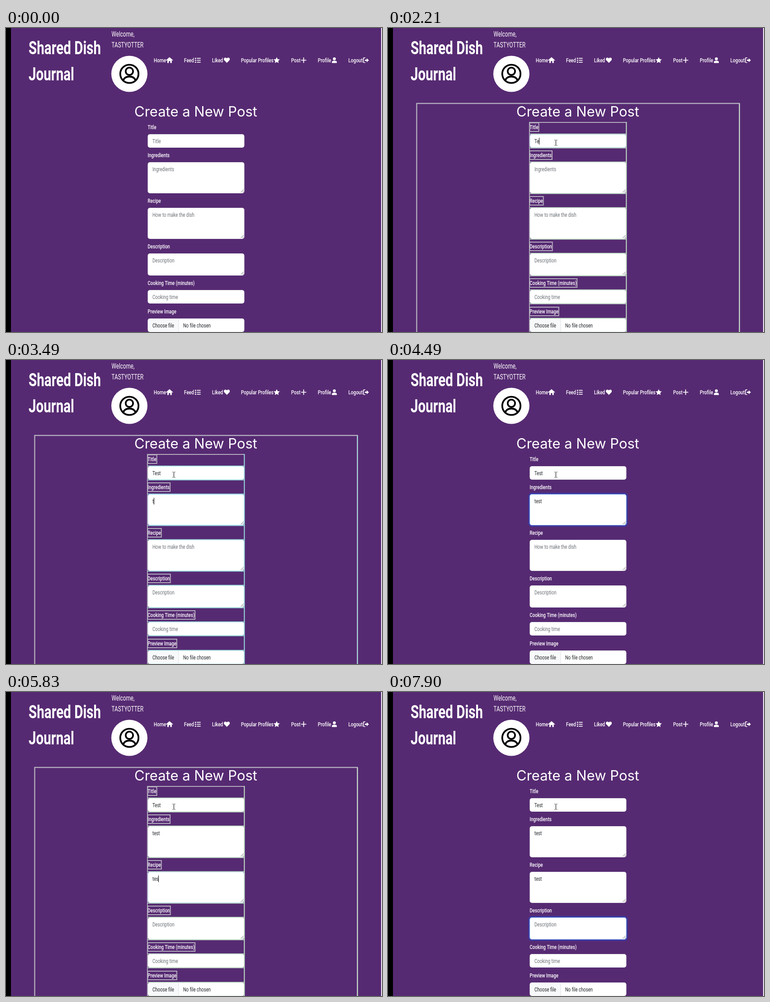
Recreate the animation shown at these times as an HTML page with a canvas. Size 832x673 px, loop 8000 ms.

```html
<!DOCTYPE html>
<html lang="en">
<head>
<meta charset="utf-8">
<title>Create a New Post</title>
<style>
html, body { margin: 0; width: 100%; height: 100%; overflow: hidden; background: #562a72; }
canvas { display: block; }
</style>
</head>
<body>
<canvas id="stage" width="832" height="673"></canvas>
<script>
const ctx = document.getElementById('stage').getContext('2d');
const LOOP = 8000, BLINK = 530;
const PURPLE = '#562a72', WHITE = '#fff', INK = '#212529', MUTED = '#6b7076';
const CONDENSE = 0.74; // one narrow face for the whole page
const LEFT = 313.5, WIDTH = 214;

// label, placeholder, top, height
const fields = [
  ['Title', 'Title', 235, 30],
  ['Ingredients', 'Ingredients', 297, 69],
  ['Recipe', 'How to make the dish', 398, 69],
  ['Description', 'Description', 499, 49],
  ['Cooking Time (minutes)', 'Cooking time', 580, 30],
  ['Preview Image', '', 643, 30]
].map(([label, hint, y, h]) => ({ label, hint, y, h }));

// time, field, value; an empty value means the field gains focus
const events = [
  [1090, 0, ''], [1950, 0, 'T'], [2210, 0, 'Te'], [2410, 0, 'Tes'], [2610, 0, 'Test'],
  [2810, 1, ''], [3490, 1, 't'], [3560, 1, 'te'], [3690, 1, 'tes'], [3760, 1, 'test'],
  [5020, 2, ''], [5360, 2, 't'], [5630, 2, 'te'], [5830, 2, 'tes'], [5900, 2, 'test'],
  [6310, 3, '']
];
const focusTimes = events.filter(e => !e[2]).map(e => e[0]);
const boxedSpans = [[1950, 2940], [3490, 4490], [5360, 6640]];
const mousePath = [
  [777, 664], [690, 625], [553, 548], [420, 440], [330, 350],
  [288, 305], [312, 282], [352, 260], [371, 254]
];

function setFont(size, weight) {
  ctx.font = `${weight} ${size}px Roboto, sans-serif`;
}
function text(str, x, y, size = 13, weight = 400, color = WHITE) {
  ctx.save();
  ctx.translate(x, y);
  ctx.scale(CONDENSE, 1);
  setFont(size, weight);
  ctx.fillStyle = color;
  ctx.fillText(str, 0, 0);
  ctx.restore();
}
function textWidth(str, weight = 400) {
  setFont(13, weight);
  return ctx.measureText(str).width * CONDENSE;
}
function rect(x, y, w, h, color) {
  ctx.fillStyle = color;
  ctx.fillRect(x, y, w, h);
}
function round(x, y, w, h, r, color) {
  ctx.beginPath();
  ctx.roundRect(x, y, w, h, r);
  ctx.fillStyle = color;
  ctx.fill();
}
function disc(x, y, r, color) {
  ctx.beginPath();
  ctx.arc(x, y, r, 0, 7);
  ctx.fillStyle = color;
  ctx.fill();
}
function shape(d, fill) {
  ctx.fillStyle = fill;
  ctx.fill(new Path2D(d));
}
function line(d, color, width, cap = 'butt') {
  ctx.strokeStyle = color;
  ctx.lineWidth = width;
  ctx.lineCap = cap;
  ctx.stroke(new Path2D(d));
}

const icons = {
  Home() {
    line('M355.2 71.4L361.8 65.6L368.4 71.4', WHITE, 1.8, 'round');
    shape('M357 71L361.8 66.5L366.8 71V77.5H363.5V73.3H360.2V77.5H357Z', WHITE);
  },
  Feed() {
    for (const y of [66, 70.3, 74.6]) {
      rect(418, y, 2.6, 2.4, WHITE);
      rect(422.3, y + 0.3, 8.4, 1.7, WHITE);
    }
  },
  Liked() {
    shape('M488.7 77.3L483 71.4C481.3 69.5 482.3 65.7 485.3 65.6' +
      'C487 65.5 488.2 66.6 488.7 67.5C489.2 66.6 490.4 65.5 492.1 65.6' +
      'C495.1 65.7 496.1 69.5 494.4 71.4Z', WHITE);
  },
  'Popular Profiles'() {
    ctx.beginPath();
    for (let i = 0; i < 10; i++) {
      const a = i * Math.PI / 5 - Math.PI / 2, r = i % 2 ? 3.5 : 7.2;
      ctx.lineTo(599 + r * Math.cos(a), 71.8 + r * Math.sin(a));
    }
    ctx.closePath();
    ctx.fillStyle = WHITE;
    ctx.fill();
  },
  Post() {
    line('M653.5 71.3H663.8M658.6 66V76.6', WHITE, 1.8, 'round');
  },
  Profile() {
    disc(726.6, 68.2, 3.2, WHITE);
    round(721, 72.6, 11.2, 4.9, [4, 4, 1, 1], WHITE);
  },
  Logout() {
    line('M795 66.2H792Q790.8 66.2 790.8 67.5V75.2Q790.8 76.5 792 76.5H795', WHITE, 1.7);
    shape('M794 70.1H798V67L803 71.4L798 75.8V72.7H794Z', WHITE);
  }
};
const navX = {
  Home: 327, Feed: 394, Liked: 456, 'Popular Profiles': 520, Post: 631, Profile: 690, Logout: 757.5
};

function drawHeader() {
  text('Shared Dish', 50, 58, 40, 700);
  text('Journal', 50, 115.5, 40, 700);
  text('Welcome,', 233.5, 19, 15.8);
  text('TASTYOTTER', 233.5, 43, 15.8);

  disc(273, 101.5, 40, WHITE);
  ctx.save();
  ctx.beginPath();
  ctx.arc(273, 101.5, 20.2, 0, 7);
  ctx.strokeStyle = '#000';
  ctx.lineWidth = 3.8;
  ctx.stroke();
  ctx.beginPath();
  ctx.arc(273, 95.8, 8.2, 0, 7);
  ctx.stroke();
  line('M259.5 115.5C262 109.5 267 107.5 273 107.5S284 109.5 286.5 115.5', '#000', 3.8);
  ctx.restore();

  for (const name in navX) {
    text(name, navX[name], 76, 13.6, 500);
    icons[name]();
  }

  ctx.font = '400 31px Inter, sans-serif';
  ctx.textAlign = 'center';
  ctx.fillStyle = WHITE;
  ctx.fillText('Create a New Post', 420, 196);
  ctx.textAlign = 'left';
}

const stepLevel = dt => dt < 0 ? 0 : dt < 60 ? 0.12 : dt < 130 ? 0.7 : 1;

function focusLevel(i, t) {
  if (i >= focusTimes.length) return 0;
  const next = focusTimes[i + 1] ?? Infinity;
  return stepLevel(t - focusTimes[i]) - stepLevel(t - next);
}

function drawField(f, i, t, value, boxed) {
  const { y, h } = f, glow = focusLevel(i, t);
  text(f.label, LEFT, y - 11, 13, 500);
  if (glow > 0 && (!boxed || t >= 6300)) {
    round(LEFT - 3, y - 3, WIDTH + 6, h + 6, 8, `rgba(13,90,253,${0.36 * glow})`);
  }
  round(LEFT, y, WIDTH, h, 5, '#dee2e6');
  if (glow > 0) round(LEFT, y, WIDTH, h, 5, `rgba(134,183,254,${glow})`);
  round(LEFT + 0.8, y + 0.8, WIDTH - 1.6, h - 1.6, 4.2, WHITE);

  if (!f.hint) {
    round(LEFT + 0.8, y + 0.8, 68, h - 1.6, [4, 0, 0, 4], '#f8f9fa');
    rect(381.5, y + 0.8, 1, h - 1.6, '#dee2e6');
    text('Choose file', 324, y + 20, 13, 400, INK);
    text('No file chosen', 392, y + 20, 13, 400, INK);
    return;
  }
  text(value || f.hint, 324, y + 20, 13, 400, value ? INK : MUTED);
  if (h > 40) {
    const b = y + h;
    line(`M519.5 ${b - 2}L526 ${b - 8.5}M523.5 ${b - 2}L526 ${b - 4.5}`, '#555', 0.9);
  }
}

function drawBoxes(t) {
  const tint = t >= 3490 && t < 3560 ? '#9be0e2' : '#c3e4c6';
  const grey = '#b4adbd';
  const frame = (x, y, w, h, color, width = 2) => {
    ctx.strokeStyle = color;
    ctx.lineWidth = width;
    ctx.strokeRect(x, y, w, h);
  };
  frame(63.5, 167, 714, 520, grey, 2.4);
  rect(777, 167, 1.6, 506, tint);
  for (const f of fields) {
    frame(313.5, f.y - 25, textWidth(f.label, 500) + 1, 19, grey);
    rect(313, f.y - 1.2, 215, 1.6, tint);
    rect(313, f.y + f.h - 0.4, 215, 1.8, tint);
  }
  rect(312, 208, 216, 2, grey);
  rect(312, 208, 1.8, 465, grey);
  rect(526.4, 208, 2, 465, tint);
}

function drawMouse(t) {
  if (t < 380) return;
  const step = Math.min(mousePath.length - 1, Math.floor((t - 380) / 70));
  const [x, y] = mousePath[step];
  const overField = x > LEFT && x < LEFT + WIDTH &&
    fields.some(f => y > f.y && y < f.y + f.h);
  ctx.save();
  ctx.translate(x, y);
  if (overField) {
    line('M-2.5 -6H-0.5M1.5 -6H3.5M0.5 -5.5V5.5M-2.5 6H-0.5M1.5 6H3.5', '#111', 1.1);
  } else {
    const arrow = 'M0 0V16L3.8 12.4L6.3 18.2L8.7 17.2L6.2 11.5H11.5Z';
    shape(arrow, WHITE);
    line(arrow, '#000', 1);
  }
  ctx.restore();
}

function draw(t) {
  rect(0, 0, 832, 673, PURPLE);
  rect(0, 0, 11, 673, '#000');
  rect(830, 0, 2, 673, '#f0edf3');
  drawHeader();

  const values = fields.map(() => '');
  let active = null;
  for (const e of events) {
    if (e[0] > t) break;
    values[e[1]] = e[2];
    active = e;
  }
  const boxed = boxedSpans.some(([from, to]) => t >= from && t < to);
  fields.forEach((f, i) => drawField(f, i, t, values[i], boxed));
  if (boxed) drawBoxes(t);

  if (active && Math.floor((t - active[0]) / BLINK) % 2 === 0) {
    const [, i, value] = active;
    rect(Math.round(324 + textWidth(value)), fields[i].y + 8, 1, 15, '#000');
  }
  drawMouse(t);
}

function tick() {
  draw((performance.now() + 2) % LOOP);
  requestAnimationFrame(tick);
}
tick();
</script>
</body>
</html>
```
